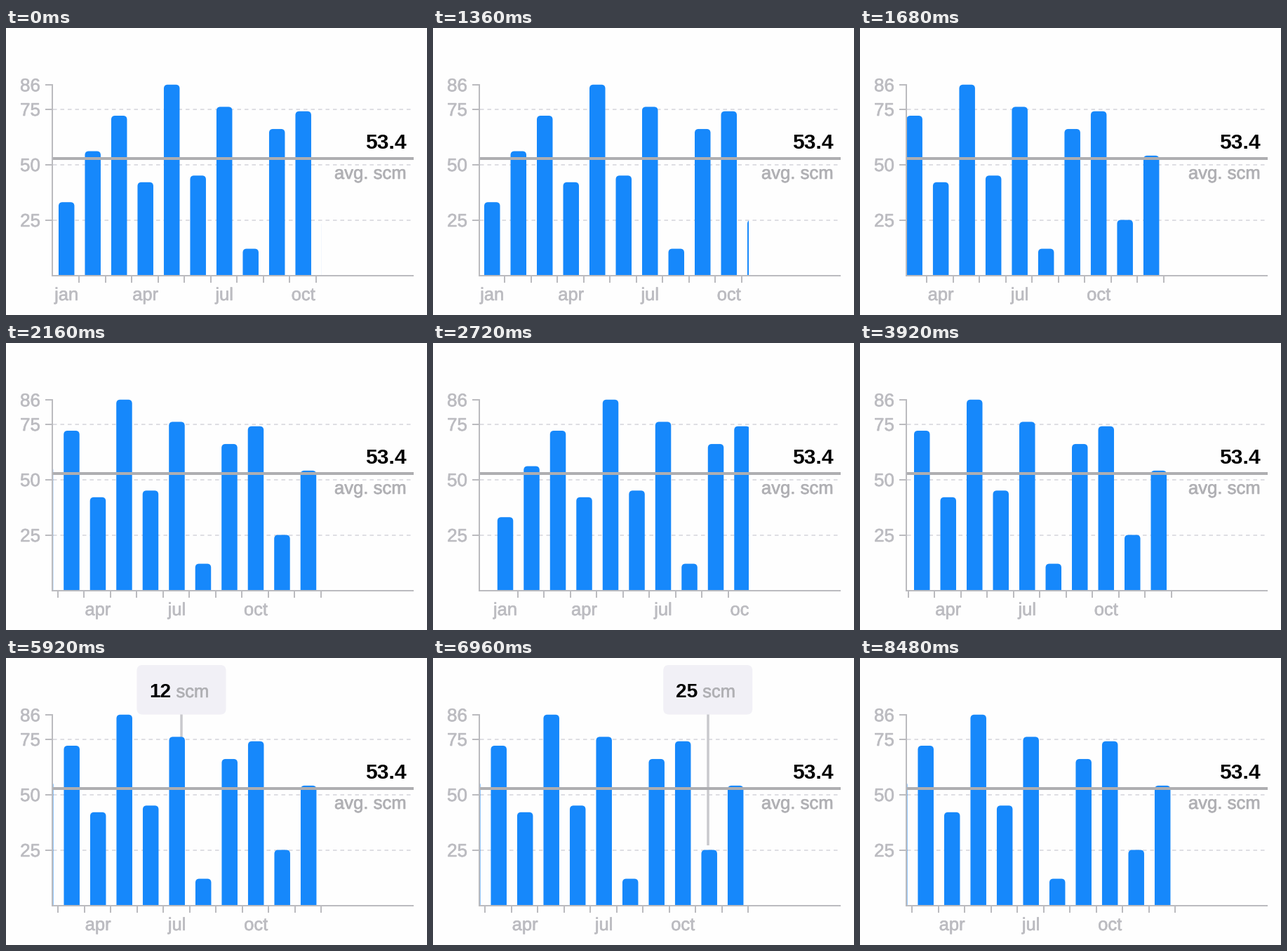
A matplotlib script for the animation above (8.56 s loop, 600 px wide and 409 px high).

```python
import numpy as np
import matplotlib.pyplot as plt
from matplotlib.animation import FuncAnimation
from matplotlib.patches import FancyBboxPatch, Rectangle
from matplotlib.patheffects import Normal, Stroke
from matplotlib.transforms import Affine2D

WIDTH, HEIGHT, DPI = 600, 409, 64
PX = 72 / DPI
FRAMES, INTERVAL = 214, 40

BACK, BLUE = "#fefefe", "#1688fb"
AXIS, GRID, AVERAGE = "#bbbbbf", "#dedee3", "#aeaeb1"
LABEL, UNIT, CARD, STEM = "#bcbcc1", "#b0b0b4", "#f1f0f6", "#c9c9cd"

VALUES = [33, 56, 72, 42, 86, 45, 76, 12, 66, 74, 25, 54]
LEFT, RIGHT, BASE = 66, 450, 353
SLOT, BAR, FIRST = 37.5, 22.5, 86.2
END = -67.5


def level(value):
    return 352.5 - 3.16 * value


plt.rcParams["font.family"] = "Liberation Sans"
fig = plt.figure(figsize=(WIDTH / DPI, HEIGHT / DPI), dpi=DPI, facecolor=BACK)
ax = fig.add_axes([0, 0, 1, 1])
ax.set(xlim=(0, WIDTH), ylim=(HEIGHT, 0))
ax.axis("off")

slide = Affine2D()
moving = slide + ax.transData


def line(xs, ys, color, width, z, **kw):
    return ax.plot(xs, ys, color=color, lw=width * PX, zorder=z,
                   solid_capstyle="butt", dash_capstyle="butt", **kw)[0]


def text(x, y, s, size, color, ha="left", z=6, bold=False, **kw):
    item = ax.text(x, y, s, fontsize=size * PX, color=color, ha=ha, va="baseline",
                   zorder=z, weight="bold" if bold else "normal", **kw)
    if not bold:
        item.set_path_effects([Stroke(linewidth=0.6 * PX, foreground=color), Normal()])
    return item


def rounded(x, y, w, h, radius, color, z, **kw):
    box = FancyBboxPatch((x, y), w, h, boxstyle=f"round,pad=0,rounding_size={radius}",
                         fc=color, ec="none", lw=0, zorder=z, **kw)
    ax.add_patch(box)
    return box


def clip(item, bottom):
    item.set_clip_on(True)
    item.set_clip_path(Rectangle((LEFT, 0), RIGHT - LEFT, bottom,
                                 transform=ax.transData))


# Vertical scale and grid
for value in (25, 50, 75, 86):
    y = level(value)
    line([56, LEFT], [y, y], AXIS, 2, 4)
    text(49, y + 9.5, str(value), 26, LABEL, "right")
    if value < 86:
        line([LEFT + 1, 580], [y, y], GRID, 2, 1, linestyle=(0, (2.75, 2.5)))
line([LEFT, LEFT], [level(86) - 1, BASE + 1], AXIS, 2, 4)
line([LEFT - 1, 581], [BASE, BASE], AXIS, 2, 4)

# Scrolling bars, ticks and month names
names = {0: "jan", 3: "apr", 6: "jul", 9: "oct"}
for i, value in enumerate(VALUES):
    center = FIRST + i * SLOT
    top = level(value)
    clip(rounded(center - BAR / 2, top, BAR, BASE - top + 15, 5.5, BLUE, 3,
                 transform=moving), BASE)
    edge = 104 + i * SLOT
    clip(line([edge, edge], [BASE, 363], AXIS, 2, 4, transform=moving), HEIGHT)
    if i in names:
        clip(text(center, 388, names[i], 25.5, LABEL, "center", transform=moving), HEIGHT)

# Average
line([LEFT + 1, 581], [185.5, 185.5], AVERAGE, 4, 5)
text(571, 172, "53.4", 30, "black", "right", bold=True)
text(571, 215, "avg. scm", 25.7, UNIT, "right")

# Callout
stem = line([0, 0], [80, 80], STEM, 3.5, 2)
card = rounded(0, 10, 127, 70.5, 8, CARD, 7)
number = text(0, 56, "", 28, "black", z=8, bold=True)
unit = text(0, 56, "scm", 25.5, UNIT, z=8)
callout = [stem, card, number, unit]


def smooth(t):
    return t * t * (3 - 2 * t)


def settle(t):
    return 1 - (1 - t) ** 3.5


# start, end, from, to, easing
SCROLLS = [
    (33, 45, 0, -99, smooth),
    (45, 57, -99, END, settle),
    (58, 71, END, 30, smooth),
    (71, 79, 30, 0, settle),
    (79, 95, 0, -90, smooth),
    (95, 104, -90, END, settle),
]


def scroll(frame):
    offset = 0
    for start, end, a, b, ease in SCROLLS:
        if frame >= start:
            offset = a + (b - a) * ease(min(1, (frame - start) / (end - start)))
    return offset


# Finger path over the bars; the callout trails the touched bar
SHOW, HIDE = 125, 212
TIMES = [125, 128, 137, 139, 141, 143, 145, 148, 156, 160, 167, 169, 187, 195, 197, 202]
TOUCH = [431, 431, 131, 131, 160, 180, 227, 266, 431, 431, 345, 393, 393, 131, 131, 281]


def trail():
    states, spot = {}, None
    for frame in range(SHOW, HIDE):
        finger = np.interp(frame, TIMES, TOUCH)
        month = int(np.clip(round((finger - FIRST - END) / SLOT), 0, 11))
        goal = np.array([FIRST + END + month * SLOT, level(VALUES[month])])
        spot = goal if spot is None else spot + 0.4 * (goal - spot)
        states[frame] = (*spot, VALUES[month])
    return states


STATES = trail()


def draw(frame):
    slide.clear().translate(scroll(frame), 0)
    state = STATES.get(frame)
    for item in callout:
        item.set_visible(state is not None)
    if state:
        x, y, value = state
        stem.set_data([x, x], [80, y])
        card.set_x(x - 64)
        number.set_text(str(value))
        number.set_x(x - 46)
        unit.set_x(x - 8)
    return callout


anim = FuncAnimation(fig, draw, frames=FRAMES, interval=INTERVAL,
                     repeat=True, repeat_delay=0, blit=False)
plt.show()
```
